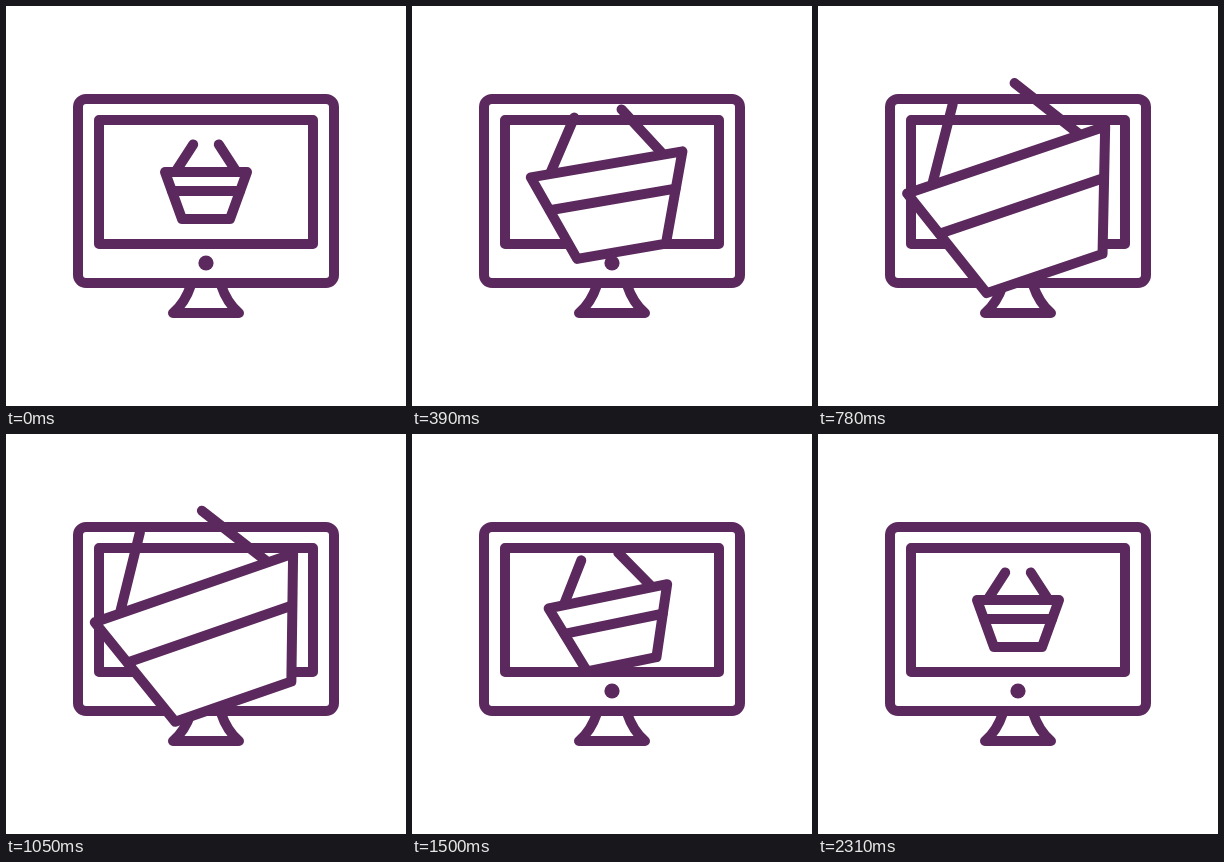
Animation of 400 by 400 pixels, one loop 4.34 s. Source, as an HTML page with a canvas:

```html
<!DOCTYPE html>
<html lang="en">
<head>
<meta charset="utf-8">
<title>Basket on a screen</title>
<style>
  html, body { margin: 0; width: 100%; height: 100%; overflow: hidden; background: #fff; }
  canvas { display: block; }
</style>
</head>
<body>
<canvas id="stage" width="400" height="400"></canvas>
<script>
const ctx = document.getElementById('stage').getContext('2d');
const INK = '#5b295d';
const LOOP = 4340;
const STEP = 30;
const PIVOT = [202.6, 176];

// time in ms, scale, angle in degrees
const KEYS = [
  [0, 1, 0], [240, 1.44, -4.3], [540, 2.288, -15.1], [780, 2.55, -18.7],
  [930, 2.575, -19], [1110, 2.53, -19.1], [1260, 2.34, -18.8],
  [1620, 1.06, -6.8], [1770, 0.81, 3], [1950, 0.9, 2],
  [2160, 0.995, 0.4], [2310, 1, 0]
];

function slope(i, c) {
  const a = KEYS[i - 1], b = KEYS[i + 1];
  return a && b ? (b[c] - a[c]) / (b[0] - a[0]) : 0;
}

// Smooth cubic through the keys
function valueAt(t, c) {
  const i = KEYS.findIndex(k => k[0] > t) - 1;
  if (i < 0) return KEYS[KEYS.length - 1][c];
  const a = KEYS[i], b = KEYS[i + 1];
  const d = b[0] - a[0], u = (t - a[0]) / d, v = 1 - u;
  return v * v * (1 + 2 * u) * a[c] + u * u * (3 - 2 * u) * b[c]
    + d * u * v * (v * slope(i, c) - u * slope(i + 1, c));
}

function trace(points, closed) {
  ctx.beginPath();
  points.forEach(p => ctx.lineTo(p[0], p[1]));
  if (closed) ctx.closePath();
}

function line(...points) {
  trace(points);
  ctx.stroke();
}

function frame(x, y, w, h, r) {
  ctx.beginPath();
  ctx.roundRect(x, y, w, h, r);
  ctx.stroke();
}

function drawMonitor() {
  frame(72, 93, 256, 184, 8);
  frame(93, 114, 214, 124, 0);

  ctx.beginPath();
  ctx.arc(200, 257, 7.6, 0, Math.PI * 2);
  ctx.fillStyle = INK;
  ctx.fill();

  ctx.beginPath();
  ctx.moveTo(185, 279);
  ctx.quadraticCurveTo(179, 297, 167, 307);
  ctx.lineTo(233, 307);
  ctx.quadraticCurveTo(221, 297, 215, 279);
  ctx.stroke();
}

function drawBasket(scale, angle) {
  const cos = scale * Math.cos(angle), sin = scale * Math.sin(angle);
  const at = (x, y) => {
    const dx = x - PIVOT[0], dy = y - PIVOT[1];
    return [PIVOT[0] + dx * cos - dy * sin, PIVOT[1] + dx * sin + dy * cos];
  };

  trace([at(159, 166), at(241, 166), at(224, 213), at(176, 213)], true);
  ctx.fillStyle = '#fff';
  ctx.fill();
  ctx.stroke();

  line(at(166, 185), at(234, 185));
  line(at(187.2, 138.5), at(170, 165));
  line(at(212.8, 138.5), at(230, 165));
}

function draw(now) {
  const t = Math.floor((now % LOOP) / STEP) * STEP;
  ctx.fillStyle = '#fff';
  ctx.fillRect(0, 0, 400, 400);
  ctx.strokeStyle = INK;
  ctx.lineWidth = 10;
  ctx.lineCap = ctx.lineJoin = 'round';
  drawMonitor();
  drawBasket(valueAt(t, 1), valueAt(t, 2) * Math.PI / 180);
}

const start = performance.now();
function tick() {
  draw(performance.now() - start);
  requestAnimationFrame(tick);
}
tick();
</script>
</body>
</html>
```
